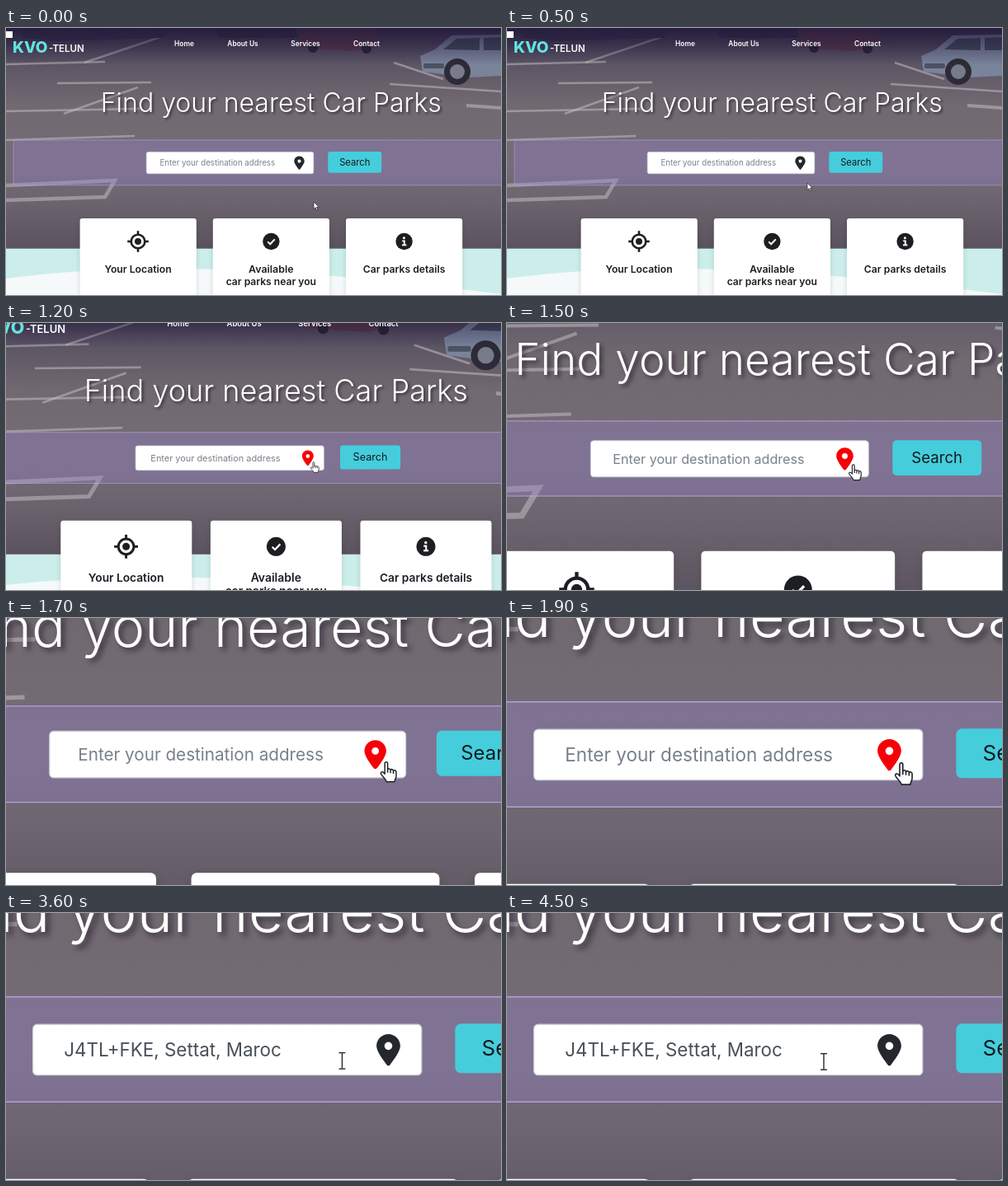
Animation of 600 by 324 pixels, one loop 4600 ms. Source, as an HTML page with a canvas:

```html
<!DOCTYPE html>
<html lang="en">
<head>
<meta charset="utf-8">
<title>Car parks</title>
<style>
html, body { margin: 0; width: 100%; height: 100%; overflow: hidden; background: #625b68; }
canvas { display: block; width: 600px; height: 324px; }
</style>
</head>
<body>
<canvas id="stage" width="600" height="324"></canvas>
<script>
const ctx = document.getElementById('stage').getContext('2d');
const LOOP = 4600, STEP = 100;
const ZOOM = { x: 274, y: 161.8, max: 2.325 };
const INK = '#1d1e22';
const PIN = new Path2D('M215.7 499.2C267 435 384 279.4 384 192C384 86 298 0 192 0S0 86 0 192c0 87.4 117 243 168.3 307.2c12.3 15.3 35.1 15.3 47.4 0zM192 128a64 64 0 1 1 0 128 64 64 0 1 1 0-128z');
const ARROW = new Path2D('M0 0V16L3.8 12.5L6.5 18.5L9 17.4L6.4 11.6H11.5Z');
const HAND = new Path2D('M5 1.6C5-.4 8-.4 8 1.6V8C8.4 6.8 10.8 7 11 8.6C11.6 7.4 13.8 7.8 14 9.4C14.8 8.4 17 9 17 10.8V15C17 17 15.5 18.5 15.2 21H6.8C6 18 1.6 14.8.8 12.4C.4 10.6 2.6 10 3.6 11.2L5 12.8Z');
const HAND_FOLDS = new Path2D('M8 8V11.5M11 8.8V12M14 9.6V12.5');
const PATH = [[0, 373, 211], [500, 364, 188], [800, 361.7, 168], [3300, 361.7, 168], [3700, 321.3, 169.8]];

const lerp = (a, b, u) => a + (b - a) * u;

function zoomAt(t) {
  let p = 0;
  if (t >= 1900) p = 1;
  else if (t >= 1500) p = .5 + .5 * Math.sin(Math.PI * (t - 1500) / 800);
  else if (t > 1000) p = .5 - .5 * Math.cos(Math.PI * (t - 1000) / 1000);
  return lerp(1, ZOOM.max, p);
}

function pointerAt(t) {
  for (let i = 1; i < PATH.length; i++) {
    const [t0, x0, y0] = PATH[i - 1], [t1, x1, y1] = PATH[i];
    if (t < t1) {
      const u = (t - t0) / (t1 - t0);
      return { x: lerp(x0, x1, u), y: lerp(y0, y1, u) };
    }
  }
  const [, x, y] = PATH[PATH.length - 1];
  return { x, y };
}

function text(str, x, y, size, weight, color, align = 'center') {
  ctx.font = `${weight} ${size}px Inter, "Open Sans", sans-serif`;
  ctx.textAlign = align;
  ctx.fillStyle = color;
  ctx.fillText(str, x, y);
}

function box(x, y, w, h, r, fill, stroke, width = .6) {
  ctx.beginPath();
  ctx.roundRect(x, y, w, h, r);
  ctx.fillStyle = fill;
  ctx.fill();
  if (stroke) line(null, stroke, width);
}

// Strokes the given flat point list, or the current path when there is none.
function line(pts, color, width) {
  if (pts) {
    ctx.beginPath();
    for (let i = 0; i < pts.length; i += 2) ctx.lineTo(pts[i], pts[i + 1]);
  }
  ctx.strokeStyle = color;
  ctx.lineWidth = width;
  ctx.stroke();
}

function poly(pts, color) {
  ctx.beginPath();
  for (let i = 0; i < pts.length; i += 2) ctx.lineTo(pts[i], pts[i + 1]);
  ctx.fillStyle = color;
  ctx.fill();
}

function disc(x, y, r, color) {
  ctx.beginPath();
  ctx.arc(x, y, r, 0, 7);
  ctx.fillStyle = color;
  ctx.fill();
}

function shadow(color, dx, dy, blur, s) {
  ctx.shadowColor = color;
  ctx.shadowOffsetX = dx * s;
  ctx.shadowOffsetY = dy * s;
  ctx.shadowBlur = blur * s;
}

function fade(y0, y1, stops) {
  const g = ctx.createLinearGradient(0, y0, 0, y1);
  stops.forEach(([at, c]) => g.addColorStop(at, c));
  return g;
}

function photo() {
  ctx.fillStyle = fade(0, 268, [[0, '#3c354a'], [.12, '#575061'], [.34, '#716970'], [.62, '#756d77'], [.78, '#6c646e'], [1, '#5a535f']]);
  ctx.fillRect(0, 0, 600, 268);

  const paint = 'rgba(196,188,194,.55)';
  [[0, 44, 120, 41], [62, 67, 176, 66], [0, 101, 162, 98], [0, 136, 156, 131],
   [190, 10, 95, 42], [160, 72, 70, 104], [465, 68, 600, 77], [470, 42, 530, 62]]
    .forEach(p => line(p, paint, 2.4));
  line([558, 94, 600, 97], paint, 4);
  line([0, 191, 132, 185, 120, 205, 0, 209], paint, 4.5);

  // parked cars
  poly([15, 0, 200, 0, 190, 12, 60, 16, 20, 12], '#39344a');
  box(255, -10, 110, 22, 6, '#363044');
  poly([352, 0, 450, 0, 448, 22, 420, 28, 356, 24], '#59384a');
  disc(372, 24, 6, '#272231');
  disc(437, 25, 6, '#272231');
  poly([502, 34, 520, 26, 540, 9, 600, 8, 600, 58, 560, 60, 505, 53], '#79839a');
  poly([530, 26, 546, 13, 574, 12, 574, 27], '#424959');
  poly([579, 12, 600, 11, 600, 27, 579, 27], '#424959');
  box(506, 43, 25, 6, 2, '#4b5263');
  disc(547, 53, 16, '#2d2b37');
  disc(547, 53, 9, '#777b8a');

  ctx.fillStyle = fade(0, 45, [[0, 'rgba(31,22,58,.75)'], [1, 'rgba(31,22,58,0)']]);
  ctx.fillRect(0, 0, 600, 45);
}

function header() {
  box(0, 4, 8, 8, 0, '#fff');
  text('KVO', 8, 30, 19, 800, '#62e3e0', 'left');
  text('-TELUN', 52, 29, 11.5, 600, '#fff', 'left');
  [['Home', 216], ['About Us', 287], ['Services', 363], ['Contact', 437]]
    .forEach(([label, x]) => text(label, x, 22, 8.4, 600, '#fff'));
}

function searchBar(filled, hot) {
  box(9, 136, 660, 54.8, 3, 'rgba(148,126,196,.36)', 'rgba(190,171,232,.85)');
  box(170.2, 150.4, 202.6, 26.4, 2.2, '#fff', '#ced4da');
  if (filled) text('J4TL+FKE, Settat, Maroc', 186.4, 167.1, 9.65, 400, '#495057', 'left');
  else text('Enter your destination address', 186.4, 167.1, 9.7, 400, '#78818a', 'left');
  ctx.save();
  ctx.translate(349.3, 155.4);
  ctx.scale(.0323, .0323);
  ctx.fillStyle = hot ? '#f60007' : '#24272c';
  ctx.fill(PIN, 'evenodd');
  ctx.restore();
  box(390.3, 150, 64.9, 25.8, 3, '#45cddc');
  text('Search', 422.7, 166.8, 11.2, 400, '#15191d');
}

function cards(s) {
  [89.6, 250.8, 412].forEach(x => {
    ctx.save();
    shadow('rgba(0,0,0,.14)', 0, 2, 6, s);
    box(x, 231, 141.2, 130, 3, '#fff');
    ctx.restore();
  });

  disc(160, 259, 4, INK);
  ctx.beginPath();
  ctx.arc(160, 259, 8.3, 0, 7);
  line(null, INK, 2.6);
  for (let i = 0; i < 4; i++) {
    const c = Math.cos(i * Math.PI / 2), n = Math.sin(i * Math.PI / 2);
    line([160 + 8 * c, 259 + 8 * n, 160 + 12.8 * c, 259 + 12.8 * n], INK, 2.6);
  }

  disc(321.4, 259, 10.2, INK);
  line([317.2, 259.4, 320.2, 262.3, 325.8, 256.4], '#fff', 2);

  disc(482.6, 259, 10.2, INK);
  disc(482.4, 254.7, 1.5, '#fff');
  line([480.2, 258.4, 482.8, 258.4, 482.8, 263.3], '#fff', 1.9);
  line([480, 263.4, 485.4, 263.4], '#fff', 1.9);

  text('Your Location', 160, 297, 12.2, 600, INK);
  text('Available', 321.3, 297, 12.4, 600, INK);
  text('car parks near you', 321.3, 311.5, 12.1, 600, INK);
  text('Car parks details', 482.6, 297, 12.2, 600, INK);
}

function pointer({ x, y }, shape) {
  ctx.save();
  ctx.translate(x, y);
  ctx.lineJoin = 'round';
  if (shape === 'beam') {
    line([0, -4, 0, 4], '#24252b', .6);
    line([-1.7, -4.2, 1.7, -4.2], '#24252b', .6);
    line([-1.7, 4.2, 1.7, 4.2], '#24252b', .6);
  } else {
    const hand = shape === 'hand', path = hand ? HAND : ARROW;
    ctx.scale(.54, .54);
    if (hand) ctx.translate(-6.5, -.4);
    ctx.fillStyle = '#fff';
    ctx.fill(path);
    ctx.strokeStyle = '#24252b';
    ctx.lineWidth = 1.3;
    ctx.stroke(path);
    if (hand) ctx.stroke(HAND_FOLDS);
  }
  ctx.restore();
}

function draw(t) {
  const s = zoomAt(t), at = pointerAt(t);
  const hot = at.x > 349 && at.y < 172;
  ctx.setTransform(s, 0, 0, s, ZOOM.x * (1 - s), ZOOM.y * (1 - s));

  ctx.fillStyle = '#cbeeeb';
  ctx.fillRect(0, 267.5, 600, 60);
  ctx.beginPath();
  ctx.moveTo(0, 304);
  ctx.bezierCurveTo(150, 284, 330, 288, 600, 323);
  ctx.lineTo(600, 330);
  ctx.lineTo(0, 330);
  ctx.fillStyle = '#f5f9fa';
  ctx.fill();

  ctx.save();
  ctx.beginPath();
  ctx.rect(0, 0, 600, 267.5);
  ctx.clip();
  photo();
  ctx.restore();

  header();
  ctx.save();
  shadow('rgba(20,14,30,.6)', 2, 2, 3, s);
  text('Find your nearest Car Parks', 321.3, 102.3, 32, 300, '#fff');
  ctx.restore();
  searchBar(t >= 2400, hot);
  cards(s);
  pointer(at, hot ? 'hand' : t > 3000 ? 'beam' : 'arrow');
}

const start = performance.now();
function tick() {
  const t = (performance.now() - start) % LOOP;
  draw(Math.floor(t / STEP) * STEP);
  requestAnimationFrame(tick);
}
tick();
</script>
</body>
</html>
```
